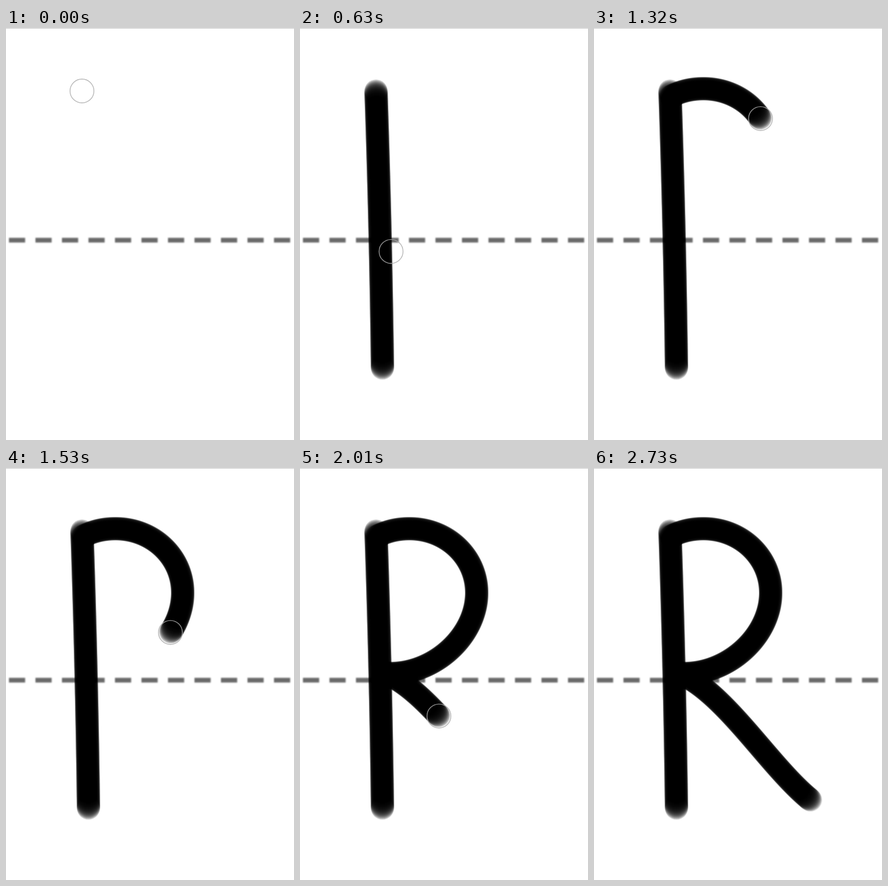
An HTML page with a canvas for the animation above (9780 ms loop, 489 by 700 pixels).

```html
<!DOCTYPE html>
<html lang="en">
<head>
<meta charset="utf-8">
<title>Writing the letter R</title>
<style>
  html, body { margin: 0; width: 100%; height: 100%; overflow: hidden; background: #fff; }
  canvas { display: block; }
</style>
</head>
<body>
<canvas id="stage" width="489" height="700"></canvas>
<script>
const LOOP = 9780, STEP = 30, PEN_OFF = 2730;
const BRUSH = 19.8, FLOW = 0.13, RING = 20.3;
const ctx = document.getElementById('stage').getContext('2d');

// Each move follows a path; keys are [time in ms, fraction of its length].
const moves = [
  move('M129 107 Q137 343 140 579', true, [[0, 0], [450, 1]]),
  move('M140 579 Q172 360 134 125', false, [[480, 0], [630, 0.44], [930, 1]]),
  move('M134 125 L131 116', false, [[1020, 0], [1050, 1]]),
  move('M131 116 C148 107 166 103 186 103 C248 103 300 150 300 212 C300 285 228 352 148 349',
    true, [[1050, 0], [1530, 0.663], [1800, 1]]),
  move('M148 350 C225 385 300 510 369 565', true,
    [[1830, 0], [1950, 0.2], [2010, 0.37], [2220, 1]]),
  move('M369 565 C337 480 375 440 467 295', false, [[2280, 0], [2430, 0.31], [2700, 1]])
];

function move(d, ink, keys) {
  const path = document.createElementNS('http://www.w3.org/2000/svg', 'path');
  path.setAttribute('d', d);
  const length = path.getTotalLength(), points = [];
  for (let s = 0; s <= length; s++) points.push(path.getPointAtLength(s));
  return { ink, keys, points };
}

function fraction(keys, t) {
  if (t <= keys[0][0]) return 0;
  for (let i = 1; i < keys.length; i++) {
    const [t0, f0] = keys[i - 1], [t1, f1] = keys[i];
    if (t < t1) return f0 + (f1 - f0) * (t - t0) / (t1 - t0);
  }
  return 1;
}

// Overlapping translucent dabs give firm sides and soft ends.
function makeDab() {
  const c = document.createElement('canvas');
  c.width = c.height = 44;
  const g = c.getContext('2d');
  g.fillStyle = `rgba(0,0,0,${FLOW})`;
  g.arc(22, 22, BRUSH, 0, Math.PI * 2);
  g.fill();
  return c;
}

function makePaper() {
  const c = document.createElement('canvas');
  c.width = 489;
  c.height = 700;
  const g = c.getContext('2d');
  g.fillStyle = '#fff';
  g.fillRect(0, 0, 489, 700);
  g.fillStyle = '#ccc';
  g.fillRect(0, 0, 489, 1);
  g.filter = 'blur(1px)';
  g.fillStyle = '#6a6a6a';
  for (let x = 5; x < 489; x += 45) g.fillRect(x, 356.5, 27.5, 8);
  return c;
}

const dab = makeDab(), paper = makePaper();

function drawRing(p) {
  ctx.strokeStyle = 'rgba(172,172,172,0.85)';
  ctx.lineWidth = 1.4;
  ctx.beginPath();
  ctx.arc(p.x, p.y, RING, 0, Math.PI * 2);
  ctx.stroke();
}

function draw(t) {
  ctx.drawImage(paper, 0, 0);
  let pen = moves[0].points[0];
  for (const m of moves) {
    if (t < m.keys[0][0]) break;
    const last = Math.round(fraction(m.keys, t) * (m.points.length - 1));
    pen = m.points[last];
    if (!m.ink) continue;
    for (let i = 0; i < last; i++) {
      ctx.drawImage(dab, m.points[i].x - 22, m.points[i].y - 22);
    }
  }
  if (t < PEN_OFF) drawRing(pen);
}

const start = performance.now();
function tick() {
  const t = (performance.now() - start) % LOOP;
  draw(Math.floor(t / STEP) * STEP);
  requestAnimationFrame(tick);
}
tick();
</script>
</body>
</html>
```
